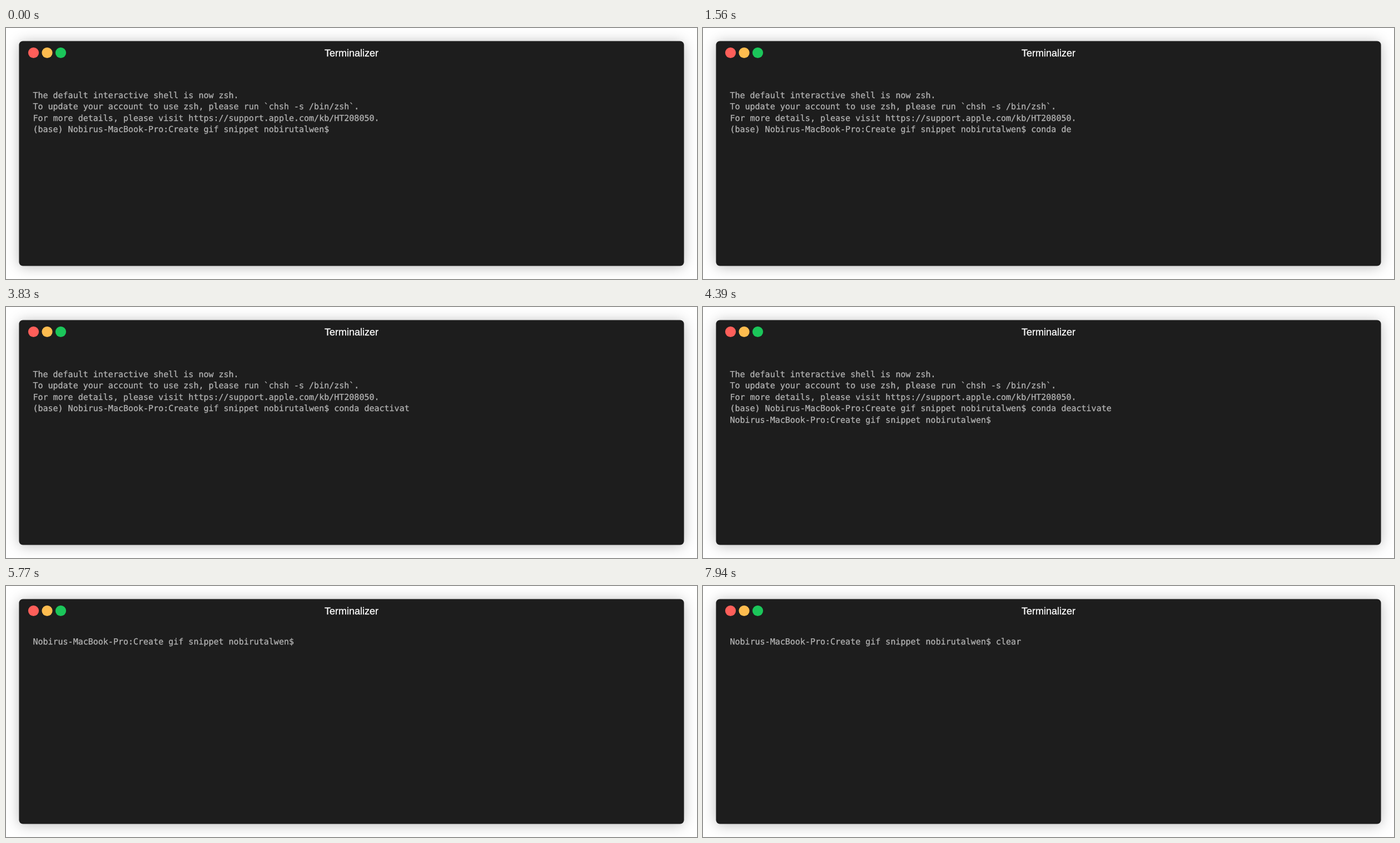
Write an HTML page that moves like this. It is 1243 px wide and 451 px high and loops after 8 s.

```html
<!DOCTYPE html>
<html lang="en">
<head>
<meta charset="utf-8">
<title>Terminal session</title>
<style>
  html, body { margin: 0; width: 100%; height: 100%; overflow: hidden; background: #fff; }
  .shadow {
    position: absolute; left: 24px; top: 24px; width: 1195px; height: 403px;
    border-radius: 7px; box-shadow: 0 2px 25px rgba(0, 0, 0, .28);
  }
  svg { position: absolute; left: 0; top: 0; display: block; }
  text { text-rendering: geometricPrecision; white-space: pre; stroke-width: .3px; }
  .title {
    font: 18px "Liberation Sans", Arial, sans-serif;
    fill: #fff; stroke: #fff; text-anchor: middle;
  }
  .row { font: 15px "DejaVu Sans Mono", monospace; fill: #b2b2b2; stroke: #b2b2b2; }
</style>
</head>
<body>
<div class="shadow"></div>
<svg id="screen" width="1243" height="451" viewBox="0 0 1243 451">
  <rect x="23.4" y="23.4" width="1196.2" height="404.2" rx="7" fill="#1d1d1d"/>
  <circle cx="49.5" cy="44.5" r="9.6" fill="#ff5f5a"/>
  <circle cx="74" cy="44.5" r="9.6" fill="#fdbc4f"/>
  <circle cx="98.5" cy="44.5" r="9.6" fill="#1bc65a"/>
  <text class="title" x="621.5" y="51">Terminalizer</text>
</svg>
<script>
  const LOOP = 8000;
  const PROMPT = "Nobirus-MacBook-Pro:Create gif snippet nobirutalwen$ ";
  const INTRO = [
    "",
    "The default interactive shell is now zsh.",
    "To update your account to use zsh, please run `chsh -s /bin/zsh`.",
    "For more details, please visit https://support.apple.com/kb/HT208050."
  ];

  // Key press times in ms
  const DEACTIVATE_KEYS = [500, 650, 820, 940, 1050, 1200, 1360, 1560,
                           1740, 1910, 2130, 2240, 2390, 2560, 3830, 4000];
  const CLEAR_KEYS = [5020, 5150, 5300, 5480, 5590];
  const PROMPT_BACK = 4390;
  const CLEARED = 5770;
  // "clear" is recalled from history and run, in turns
  const TOGGLES = [6290, 6620, 7070, 7560, 7940];

  const passed = (times, t) => times.filter(at => at <= t).length;
  const typed = (command, keys, t) => command.slice(0, passed(keys, t));

  function linesAt(t) {
    if (t >= CLEARED) {
      return [PROMPT + (passed(TOGGLES, t) % 2 ? "clear" : "")];
    }
    const lines = [...INTRO, "(base) " + PROMPT + typed("conda deactivate", DEACTIVATE_KEYS, t)];
    if (t >= PROMPT_BACK) lines.push(PROMPT + typed("clear", CLEAR_KEYS, t));
    return lines;
  }

  const rows = Array.from({ length: 6 }, (_, i) => {
    const row = document.createElementNS("http://www.w3.org/2000/svg", "text");
    row.setAttribute("class", "row");
    row.setAttribute("x", 48.4);
    row.setAttribute("y", Math.round(105 + 20.6 * i));
    return document.getElementById("screen").appendChild(row);
  });

  function draw() {
    const lines = linesAt(performance.now() % LOOP);
    rows.forEach((row, i) => {
      const line = lines[i] || "";
      if (row.textContent !== line) row.textContent = line;
    });
    requestAnimationFrame(draw);
  }
  draw();
</script>
</body>
</html>
```
